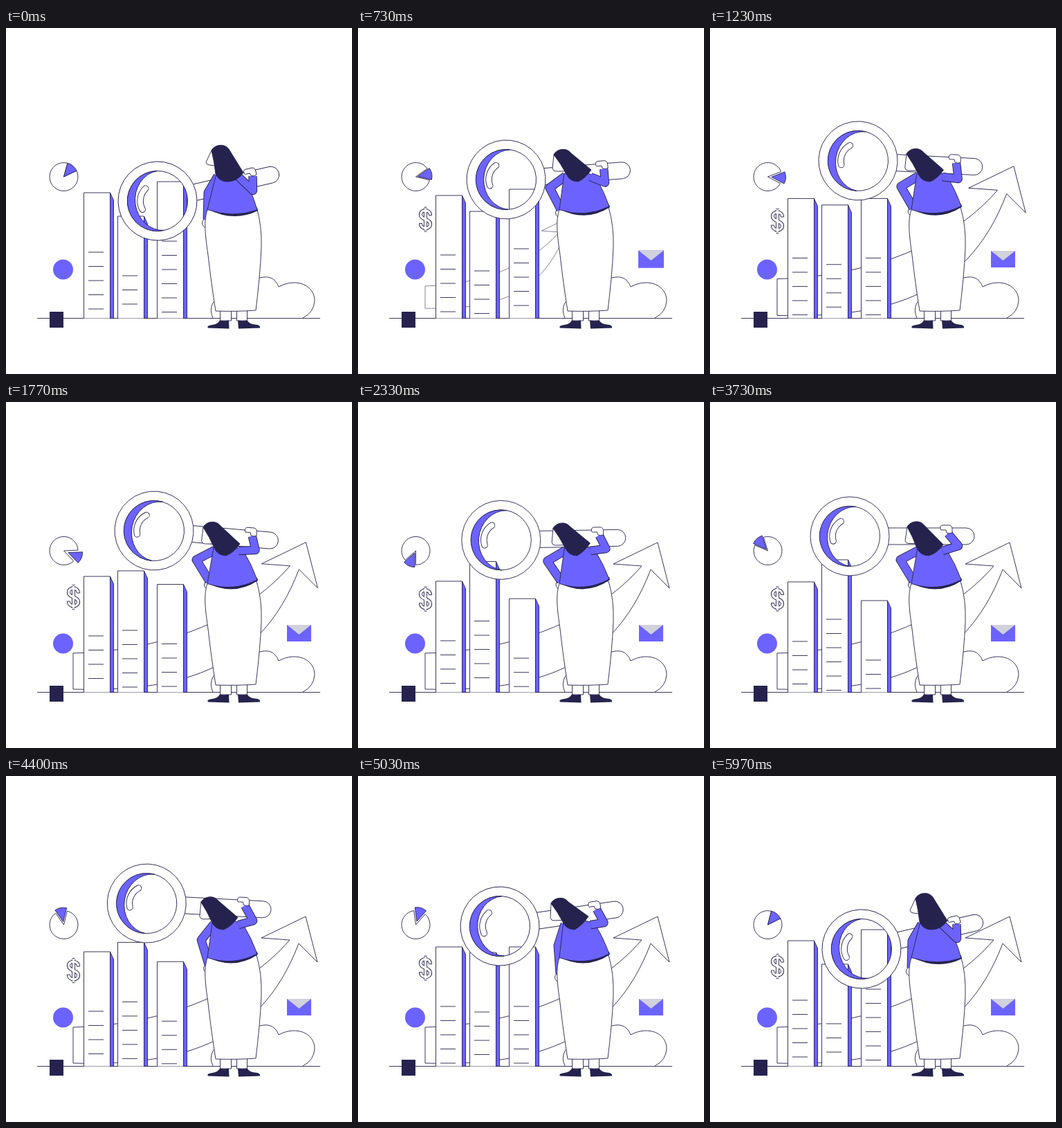
Animation of 500x500 px, one loop 6000 ms. Source, as an HTML page with a canvas:

```html
<!DOCTYPE html>
<html lang="en">
<head>
<meta charset="utf-8">
<title>Data research</title>
<style>
html, body { margin: 0; width: 100%; height: 100%; overflow: hidden; background: #fff; }
canvas { display: block; }
</style>
</head>
<body>
<canvas id="stage" width="500" height="500"></canvas>
<script>
const ctx = document.getElementById('stage').getContext('2d');
const LOOP = 6000, TAU = Math.PI * 2, RAD = Math.PI / 180;
const INK = '#25234d', VIOLET = '#6c63ff', WHITE = '#fff', GREY = '#d2d1de';

// Smooth periodic curve through the given values, without overshoot.
function track(values, times = [0, 730, 1770, 2870, 3730, 5030], wrap = 0) {
  const n = values.length;
  const turn = i => Math.floor(i / n);
  const val = i => values[i - turn(i) * n] + wrap * turn(i);
  const time = i => times[i - turn(i) * n] + LOOP * turn(i);
  const rise = i => (val(i + 1) - val(i)) / (time(i + 1) - time(i));
  const slope = i => {
    const a = rise(i - 1), b = rise(i);
    return a * b <= 0 ? 0 : 2 * a * b / (a + b);
  };
  return t => {
    let i = n - 1;
    while (time(i) > t) i--;
    const h = time(i + 1) - time(i), u = (t - time(i)) / h, w = 1 - u;
    return val(i) * (1 + 2 * u) * w * w + slope(i) * h * u * w * w
      + val(i + 1) * u * u * (3 - 2 * u) - slope(i + 1) * h * u * u * w;
  };
}

// Grow from nothing, overshoot slightly, settle at full size.
function pop(t, start, peak, end, over) {
  if (t <= start) return 0;
  if (t >= end) return 1;
  if (t < peak) return over * (1 - ((peak - t) / (peak - start)) ** 2);
  const u = (t - peak) / (end - peak);
  return over + (1 - over) * u * u * (3 - 2 * u);
}

const lensTimes = [0, 730, 1270, 1770, 2870, 3730, 4380, 5030];
const lensX = track([219, 214, 214, 200, 202, 205]);
const lensY = track([250, 219, 191, 186, 212, 194, 184, 217], lensTimes);
const lensTilt = track([-13, -4.5, 3.2, 4.8, -6.5, 0, 3, -8.2], lensTimes);
const bars = [
  [112.5, track([238, 242, 252, 263, 260, 247])],
  [161.5, track([272, 265, 244, 223, 228, 255])],
  [218.5, track([222, 233, 263.5, 296, 287, 247])]
];
const pieTurn = track([-50, -11, 22, 202, 228, 287], undefined, 360);
const pieGap = track([0, 3, 7, 0, 3, 5]);
const headX = track([297, 283, 285, 279, 285, 279]);
const headY = track([177, 183, 181, 184, 180.5, 184]);
const noseX = track([-8, -2, -2.5, -1, -3, -1]);
const noseY = track([17, 20, 20, 21, 20, 21]);
const tipX = track([343, 337, 338, 333, 337, 333]);
const tipY = track([209, 205, 205, 203, 206, 203]);
const napeX = track([320, 318, 318, 315, 316, 313]);
const shoulderX = track([304, 298, 300, 297, 300, 297]);
const hemY = track([263, 258, 257, 255.5, 257, 257]);
const leftElbowX = track([292, 277, 275, 273, 275, 289]);
const leftElbowY = track([238, 231, 228, 231.5, 228, 245]);
const leftHandX = track([291, 293, 294, 293, 294, 292]);
const leftHandY = track([277, 262, 259, 259, 259, 286]);
const elbowX = track([357, 357, 360.5, 356.5, 359, 355.5]);
const elbowY = track([235, 223.5, 214, 210.5, 208, 212]);

function shape(d, fill, line = INK) {
  const p = typeof d === 'string' ? new Path2D(d) : d;
  if (fill) { ctx.fillStyle = fill; ctx.fill(p, 'evenodd'); }
  if (line) { ctx.strokeStyle = line; ctx.lineWidth = 0.9; ctx.stroke(p); }
}

// Thick stroke with a thin outline.
function tube(d, width, fill, cap = 'butt') {
  const p = new Path2D(d);
  ctx.lineCap = cap;
  for (const [color, w] of [[INK, width + 0.9], [fill, width - 0.9]]) {
    ctx.strokeStyle = color;
    ctx.lineWidth = w;
    ctx.stroke(p);
  }
  ctx.lineCap = 'butt';
}

function disc(x, y, r, fill, line) {
  const p = new Path2D();
  p.arc(x, y, r, 0, TAU);
  shape(p, fill, line);
}

function at(x, y, scale, angle, draw) {
  if (scale <= 0) return;
  ctx.save();
  ctx.translate(x, y);
  ctx.rotate(angle);
  ctx.scale(scale, scale);
  draw();
  ctx.restore();
}

function arrow() {
  shape('M0-26C123-29 243-71 313-152L272-155L336-186L353-120L326-147C268 6 143 29 0 26Z', WHITE);
}

function dollar() {
  tube('M0-16V16M7-6C7-15-7-15-7-7C-7 1 7-1 7 7C7 15-7 15-7 6', 4.2, WHITE);
  shape('M-2-17.5H2M-2 17.5H2M-9 6H-5M5-6H9');
}

function envelope() {
  shape('M-17.5-12H17.5V12H-17.5Z', VIOLET, null);
  shape('M-17.5-12H17.5L0 2Z', GREY, null);
}

function pie(t) {
  const mid = pieTurn(t) * RAD, half = 24.5 * RAD, gap = pieGap(t);
  const wedge = (x, y, from, to, fill) => {
    const p = new Path2D();
    p.moveTo(x, y);
    p.arc(x, y, 20.5, from, to);
    p.closePath();
    shape(p, fill);
  };
  wedge(83.5, 215, mid + half, mid - half + TAU, WHITE);
  wedge(83.5 + gap * Math.cos(mid), 215 + gap * Math.sin(mid), mid - half, mid + half, VIOLET);
}

function bar(x, top) {
  shape(`M${x} 419.5V${top}h38V419.5`, WHITE);
  shape(`M${x + 38} ${top}l5 11V419.5h-5Z`, VIOLET);
  for (let y = top + 86; y < 419; y += 20.5) shape(`M${x + 6.5} ${y}h22`);
}

function magnifier() {
  shape('M54-12H168A12 12 0 0 1 168 12H54Z', WHITE);
  const ring = new Path2D();
  ring.arc(0, 0, 57, 0, TAU);
  ring.moveTo(43.5, 0);
  ring.arc(0, 0, 43.5, 0, TAU);
  shape(ring, WHITE);
  shape('M9-42.5A43.5 43.5 0 1 0 0 43.5A39 43.3 6 0 1 9-42.5Z', VIOLET);
  tube('M-24 6.9A25 25 0 0 1-12.9-21.4', 8.6, WHITE, 'round');
}

function woman(t, lens) {
  const [lx, ly, tilt] = lens;
  const onHandle = (x, y) => [
    lx + x * Math.cos(tilt) - y * Math.sin(tilt),
    ly + x * Math.sin(tilt) + y * Math.cos(tilt)
  ];

  // far arm
  const sx = shoulderX(t), hx = leftHandX(t), hy = leftHandY(t);
  disc(hx - 1, hy + 5, 6.5, WHITE);
  tube(`M${sx + 2} 214L${leftElbowX(t)} ${leftElbowY(t)}L${hx} ${hy}`, 12, VIOLET);

  // legs, shoes, skirt
  shape('M309.5 408V423H325.5V408M333.5 408V423H348.5V408', WHITE);
  shape('M309 422.5Q315 424 322 422.5L322.5 434.5L292 433.5Q289 430 298 429Q306 428 309 422.5Z', INK, null);
  shape('M335 422.5Q342 424 348.5 422.5Q352 428 360 428.5Q368 429 367 433.5L336 434.5Z', INK, null);
  shape('M291.5 261C285 278 288 300 292 328Q297 372 303 409Q335 410 361 408Q367 360 369 318Q370 285 362 259Z', WHITE);

  // top
  const hem = hemY(t);
  shape(`M292 262Q329 281 364 ${hem + 1}L363 ${hem - 3}Z`, INK, null);
  shape(`M${sx} 210L291 262.5Q328 275 363 ${hem}Q355 235 344 217Q332 204 ${sx} 210Z`, VIOLET);

  // near arm and hand
  const [wx, wy] = onHandle(142, -4);
  tube(`M336 215L${elbowX(t)} ${elbowY(t)}L${wx} ${wy}`, 11.5, VIOLET);
  const [px, py] = onHandle(139, -10);
  at(px, py, 1, tilt, () =>
    shape('M-8-1Q-9-6-4-6H5Q9-5 9 0L9 5Q5 7 1 5L0 1H-5Q-8 2-8-1Z', WHITE));

  // face and hair
  const ax = headX(t), ay = headY(t), nx = ax + noseX(t), ny = ay + noseY(t);
  const bx = napeX(t), rx = tipX(t), ry = tipY(t);
  shape(`M${ax} ${ay}L${nx} ${ny}Q${nx + 1} ${ny + 4} ${nx + 5} ${ny + 4}L${ax + 20} ${ay + 24}Z`, WHITE);
  shape(`M${ax} ${ay}C${ax + 3} ${ay - 7} ${ax + 17} ${ay - 12} ${ax + 25} ${ay - 2}`
    + `L${rx} ${ry}Q${rx - 9} ${ry + 13} ${bx} 222Q${bx - 12} 222 ${bx - 17} 211`
    + `Q${(ax + bx - 15) / 2} ${(ay + 209) / 2} ${ax} ${ay}Z`, INK);
}

function draw(t) {
  ctx.fillStyle = WHITE;
  ctx.fillRect(0, 0, 500, 500);
  ctx.lineJoin = 'round';

  at(97, 389, pop(t, 400, 1290, 1850, 1.022), 0, arrow);
  shape('M299 419C294 408 297 398 302 394L361 363Q386 353 394 374C420 360 446 372 446 394Q445 411 429 419', WHITE);
  shape('M45 419.5H454');
  pie(t);
  at(97.5, 280.5 - 5.5 * Math.cos(TAU * t / LOOP), pop(t, 30, 480, 720, 1.06), 0, dollar);
  at(423.5, 334, pop(t, 150, 640, 1100, 1.06), 0, envelope);
  disc(82.5, 349, 14.5, VIOLET, null);
  for (const [x, top] of bars) bar(x, top(t));
  shape('M63 410H83V433H63Z', INK, null);

  const lens = [lensX(t), lensY(t), lensTilt(t) * RAD];
  at(lens[0], lens[1], 1, lens[2], magnifier);
  woman(t, lens);
}

const begin = performance.now();
function tick() {
  draw((performance.now() - begin) % LOOP);
  requestAnimationFrame(tick);
}
tick();
</script>
</body>
</html>
```
